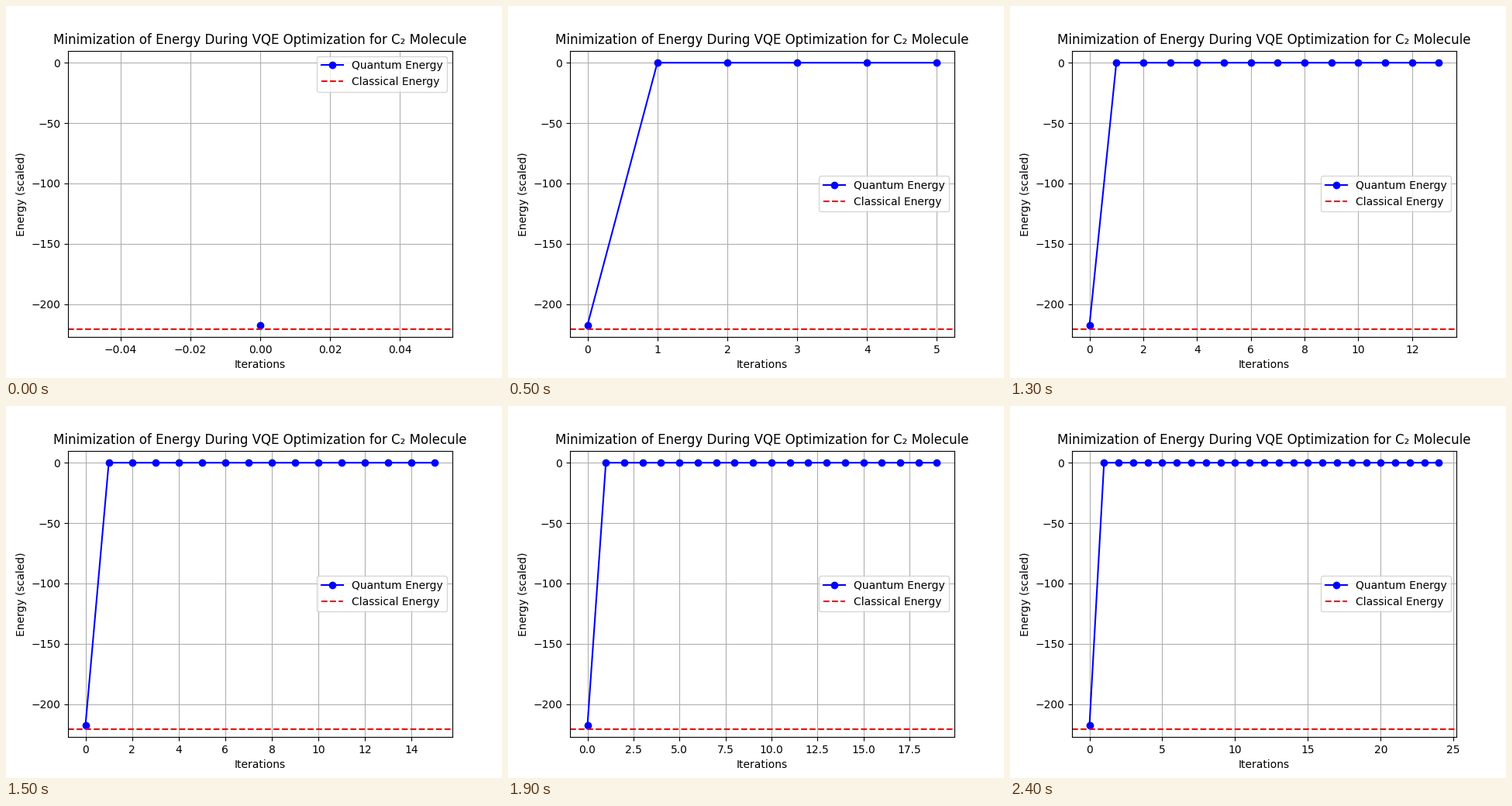
Write a matplotlib script that moves like this. It is 640 px wide and 480 px high and loops after 2.5 s.

```python
import matplotlib.pyplot as plt
import numpy as np
from matplotlib.animation import FuncAnimation

STEPS = 25
START = -217.4
CLASSICAL = -220.7

iterations = np.arange(STEPS)
energy = np.where(iterations == 0, START, 0.0)

fig, ax = plt.subplots(figsize=(6.4, 4.8), dpi=100)


def draw(i):
    ax.clear()
    ax.plot(iterations[:i + 1], energy[:i + 1], "o-", color="blue",
            label="Quantum Energy")
    ax.axhline(CLASSICAL, color="red", linestyle="--",
               label="Classical Energy")
    ax.set_ylim(START - 10, 10)
    ax.set_title("Minimization of Energy During VQE Optimization "
                 "for C\u2082 Molecule")
    ax.set_xlabel("Iterations")
    ax.set_ylabel("Energy (scaled)")
    ax.grid(True)
    ax.legend(loc="best")
    return ax.lines


anim = FuncAnimation(fig, draw, frames=STEPS, init_func=lambda: draw(0),
                     interval=100, repeat=True, repeat_delay=0)

plt.show()
```
